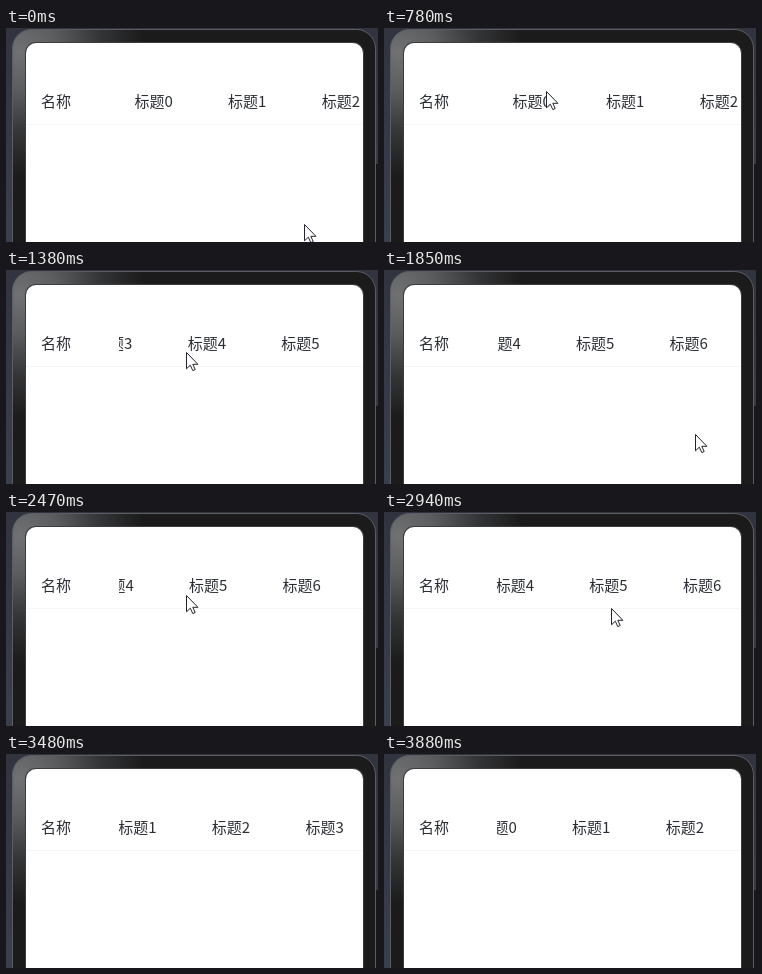
Write an HTML page that moves like this. It is 372x214 px and loops after 3950 ms.

```html
<!DOCTYPE html>
<html lang="zh-CN">
<head>
<meta charset="utf-8">
<style>
html, body { margin: 0; height: 100%; overflow: hidden; background: #31343f; }
svg { display: block; width: 100%; height: 100%; }
text { font: 15px "Noto Sans CJK SC", "Noto Sans CJK", sans-serif; fill: #2a2d33; }
</style>
</head>
<body>
<svg viewBox="0 0 372 214">
  <defs>
    <linearGradient id="backdrop" x2="0" y2="1">
      <stop stop-color="#31343f"/><stop offset="1" stop-color="#3a3f4e"/>
    </linearGradient>
    <radialGradient id="sheen" gradientUnits="userSpaceOnUse" cx="14" cy="24" r="125">
      <stop stop-color="#707173"/><stop offset=".3" stop-color="#5c5d5f"/>
      <stop offset=".65" stop-color="#343536"/><stop offset="1" stop-color="#1b1b1c"/>
    </radialGradient>
    <clipPath id="columns"><rect x="113" y="60" width="244" height="30"/></clipPath>
  </defs>
  <rect width="372" height="214" fill="url(#backdrop)"/>
  <rect x="370" y="136" width="2" height="78" fill="#17181b"/>
  <rect x="6.5" y="1.5" width="363" height="260" rx="19" fill="url(#sheen)" stroke="#5b5d63"/>
  <rect x="19" y="14" width="339" height="240" rx="11" fill="#3c3c3e"/>
  <rect x="20" y="15" width="337" height="240" rx="10" fill="#fff"/>
  <path d="M20 96.5H357" stroke="#f6f6f6"/>
  <text x="35" y="79">名称</text>
  <g clip-path="url(#columns)"><g id="titles"></g></g>
  <path id="cursor" d="M.5 .5V16.8L4.3 13.2L6.8 18.6L9.2 17.5L6.8 12.3H11.9Z" fill="#fff" stroke="#22242c"/>
</svg>
<script>
const LOOP = 3950, STEP = 77.3, LAST = 50;
const COLUMN = 93.6, FAR = 413.5, NEAR = 34;
const titles = document.getElementById('titles');
const cursor = document.getElementById('cursor');

for (let i = 0; i < 8; i++) {
  const label = document.createElementNS('http://www.w3.org/2000/svg', 'text');
  label.setAttribute('x', 128.5 + COLUMN * i);
  label.setAttribute('y', 79);
  label.textContent = '标题' + i;
  titles.append(label);
}

// Where the pointer turns or rests: step, x, y
const stops = [
  [0, 298, 196], [7, 249, 77], [8, 249, 77], [10, 162, 63], [13, 117, 77],
  [18, 180, 82], [24, 311, 164], [33, 175, 80], [34, 175, 80],
  [41, 260, 107], [46, 290, 235]
];

const progress = (step, start, end) =>
  Math.min(1, Math.max(0, (step - start) / (end - start)));
const smooth = u => u * u * (3 - 2 * u);
const fling = u => 1 - (1 - u) ** 3.155;
const dragAndFling = u => u * u / (u * u + (1 - u) ** 2);

const scrollAt = step =>
  FAR * fling(progress(step, 11, 29.5)) -
  (FAR - NEAR) * dragAndFling(progress(step, 35, LAST));

function pointerAt(step) {
  const found = stops.findIndex(stop => stop[0] > step);
  const next = found < 0 ? stops.length - 1 : found;
  const [start, x0, y0] = stops[next - 1];
  const [end, x1, y1] = stops[next];
  const u = smooth(progress(step, start, end));
  return [x0 + (x1 - x0) * u, y0 + (y1 - y0) * u].map(Math.round);
}

function draw(now) {
  const step = Math.min(LAST, Math.floor((now % LOOP + 12) / STEP));
  titles.setAttribute('transform', `translate(${-scrollAt(step)} 0)`);
  cursor.setAttribute('transform', `translate(${pointerAt(step)})`);
}

const begin = performance.now();
function tick() {
  draw(performance.now() - begin);
  requestAnimationFrame(tick);
}
tick();
</script>
</body>
</html>
```
